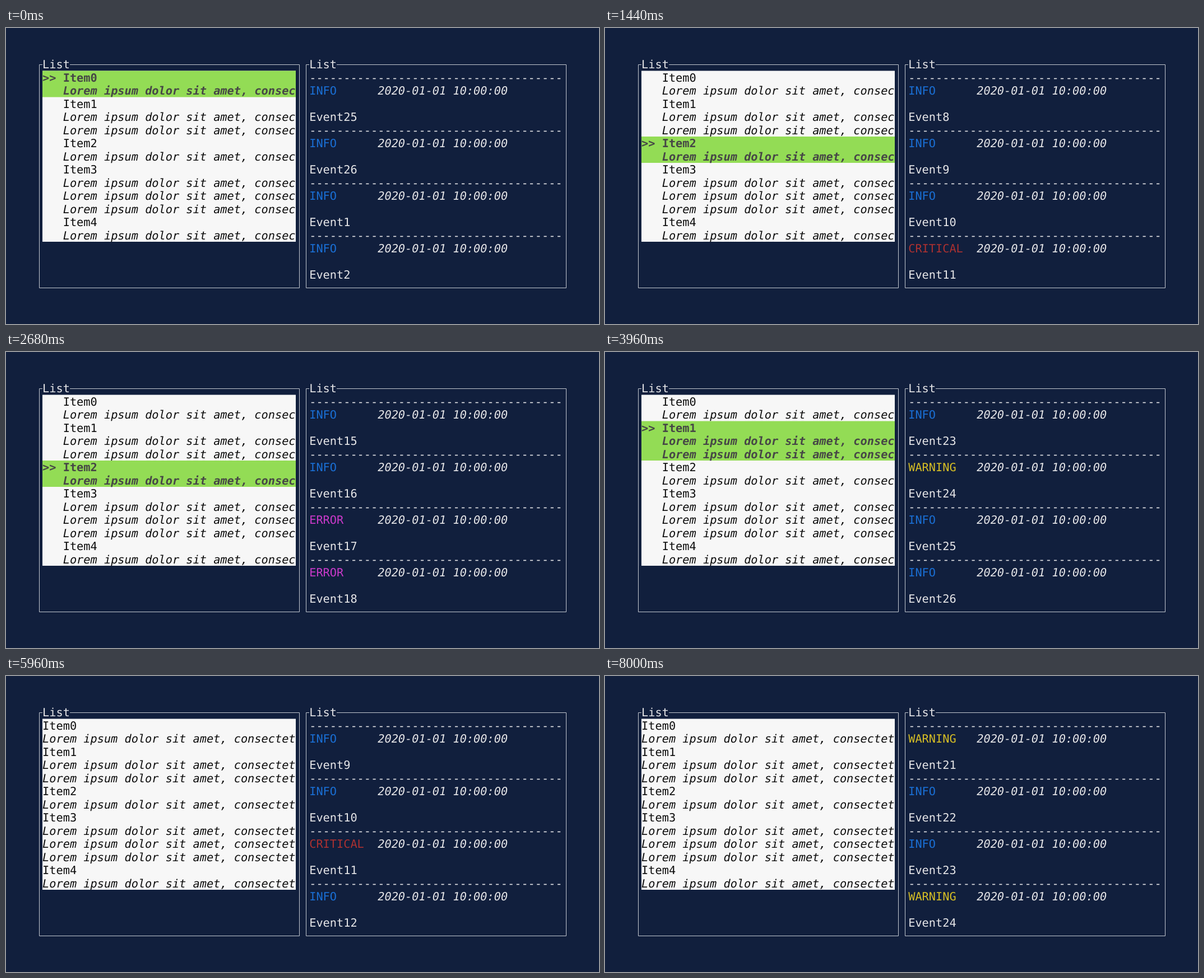
An HTML page that plays this animation: 1058x529 px, repeating every 8.04 s.

```html
<!DOCTYPE html>
<html lang="en">
<head>
<meta charset="utf-8">
<title>List</title>
<style>
  html, body { margin: 0; width: 100%; height: 100%; overflow: hidden; background: #111f3d; }
  svg { display: block; width: 1058px; height: 529px; }
  text {
    font: 20.28px "DejaVu Sans Mono", monospace;
    text-rendering: geometricPrecision;
    white-space: pre;
    fill: #e6e6e8;
  }
  .i { font-style: italic; }
  .dark { fill: #0c0c0c; }
  .picked { fill: #464646; font-weight: bold; }
  .INFO { fill: #1a70d6; }
  .WARNING { fill: #d6be25; }
  .ERROR { fill: #cb3acb; }
  .CRITICAL { fill: #ac3131; }
  path { fill: none; stroke: #c3c8d0; }
</style>
</head>
<body>
<svg viewBox="0 0 1058 529">
  <path d="M65 65.5H59.5V464.5H523.5V65.5H114"/>
  <path d="M541 65.5H535.5V464.5H999.5V65.5H590"/>
  <g id="frame"></g>
  <g id="items"></g>
  <g id="events"></g>
</svg>
<script>
const LOOP = 8040;
const COL = 12.208, ROW = 23.5, TOP = 76.5, BASELINE = 19.3;
const LEFT = 65.1, RIGHT = 541.2, COLUMNS = 37;
const LOREM = 'Lorem ipsum dolor sit amet, consectet';
const ITEM_LINES = [1, 2, 1, 3, 1];
const EVENT_COUNT = 26, FIRST_EVENT = 25, VISIBLE = 4;
const LEVELS = { 3: 'CRITICAL', 4: 'ERROR', 7: 'WARNING', 11: 'CRITICAL',
  17: 'ERROR', 18: 'ERROR', 21: 'WARNING', 24: 'WARNING' };

// The log advances every 160 ms; these ticks arrive 40 ms late.
const LATE_TICKS = [4, 8, 12, 18, 22, 29, 33, 38, 43, 47];
const ticks = [];
for (let k = 1, t = 80; k <= 48; k++) {
  if (LATE_TICKS.includes(k)) t += 40;
  ticks.push(t);
  t += 160;
}

// One key press every 680 ms; -1 means nothing is selected.
const SELECTIONS = [0, 1, 2, 3, 2, 1, -1];
const keys = SELECTIONS.slice(1).map((_, i) => 640 + 680 * i);

const byId = id => document.getElementById(id);
const passed = (times, t) => times.filter(time => time <= t).length;
const text = (x, row, col, content, cls = '') =>
  `<text x="${x + col * COL}" y="${TOP + row * ROW + BASELINE}" class="${cls}">${content}</text>`;
const block = (row, rows, fill) =>
  `<rect x="65" y="${TOP + row * ROW}" width="452" height="${rows * ROW}" fill="${fill}"/>`;

function drawItems(selected) {
  const indent = selected < 0 ? 0 : 3;
  let row = 0;
  let out = block(0, 13, '#f7f7f7');
  ITEM_LINES.forEach((lines, i) => {
    const picked = i === selected;
    const cls = picked ? 'picked' : 'dark';
    if (picked) out += block(row, lines + 1, '#93dc55') + text(LEFT, row, 0, '&gt;&gt;', cls);
    out += text(LEFT, row++, indent, 'Item' + i, cls);
    for (let n = 0; n < lines; n++) {
      out += text(LEFT, row++, indent, LOREM.slice(0, COLUMNS - indent), cls + ' i');
    }
  });
  byId('items').innerHTML = out;
}

function drawEvents(offset) {
  let out = '';
  for (let i = 0; i < VISIBLE; i++) {
    const id = (FIRST_EVENT - 1 + offset + i) % EVENT_COUNT + 1;
    const level = LEVELS[id] || 'INFO';
    const row = i * 4;
    out += text(RIGHT, row, 0, '-'.repeat(COLUMNS))
      + text(RIGHT, row + 1, 0, level, level)
      + text(RIGHT, row + 1, 10, '2020-01-01 10:00:00', 'i')
      + text(RIGHT, row + 3, 0, 'Event' + id);
  }
  byId('events').innerHTML = out;
}

byId('frame').innerHTML = text(LEFT, -0.5 - 0.5, 0, 'List') + text(RIGHT, -1, 0, 'List');

const start = performance.now();
let shownSelection, shownOffset;
function render() {
  const t = (performance.now() - start) % LOOP;
  const selection = SELECTIONS[passed(keys, t)];
  const offset = passed(ticks, t);
  if (selection !== shownSelection) drawItems(shownSelection = selection);
  if (offset !== shownOffset) drawEvents(shownOffset = offset);
  requestAnimationFrame(render);
}
render();
</script>
</body>
</html>
```
